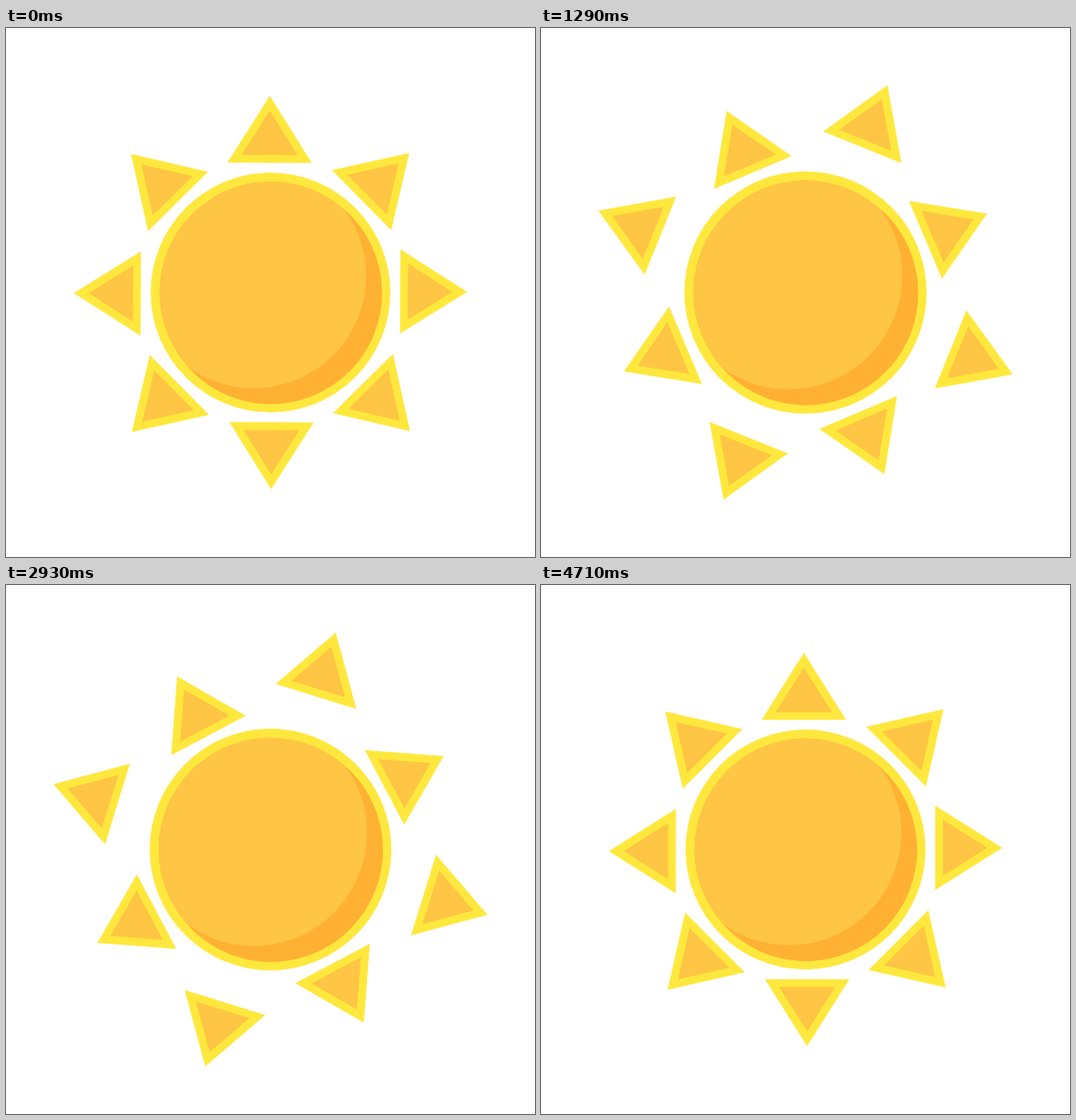
These frames come from a looping animation (640 px wide and 640 px high, 4780 ms). An HTML page:

```html
<!DOCTYPE html>
<html lang="en">
<head>
<meta charset="utf-8">
<title>Sun</title>
<style>
  html, body { margin: 0; height: 100%; overflow: hidden; background: #fff; }
  svg { display: block; width: 100%; height: 100%; }
</style>
</head>
<body>
<svg viewBox="-320 -320 640 640">
  <defs>
    <g id="ray">
      <path fill="#ffe83d" d="M0-238L51-157H-51Z"/>
      <path fill="#ffc544" d="M0-220L34-166.3H-34Z"/>
    </g>
  </defs>
  <g id="rays"></g>
  <g id="disc">
    <circle r="145" fill="#ffe83d"/>
    <circle r="134.5" fill="#ffc544"/>
    <path fill="#ffb134" d="M90-99.9A134.5 134.5 0 1 1-99.9 90A136 136 0 0 0 90-99.9Z"/>
  </g>
</svg>
<script>
  const LOOP = 4780;
  const TURN = 4800, BEAT = 800;
  const STEP_RATE = 14, POSE_RATE = 25;
  // Rays move out and back; peaks alternate between straight and diagonal rays
  const PEAKS = [740, 1480, 2080, 2900, 3730];
  const PUSH = 37, PUSH_TIME = 660;

  const rays = document.getElementById('rays');
  const disc = document.getElementById('disc');
  for (let i = 0; i < 8; i++) {
    const ray = document.createElementNS('http://www.w3.org/2000/svg', 'use');
    ray.setAttribute('href', '#ray');
    rays.append(ray);
  }

  const ease = x => {
    x = Math.min(1, Math.max(0, x));
    return x * x * (3 - 2 * x);
  };

  const push = (t, group) => PEAKS.reduce((sum, peak, k) =>
    k % 2 === group ? sum + PUSH * ease(1 - Math.abs(t - peak) / PUSH_TIME) : sum, 0);

  function draw(t) {
    const angle = 360 * ease(t / TURN) + 0.3;
    const offsets = [push(t, 0), push(t, 1)];
    [...rays.children].forEach((ray, i) => ray.setAttribute('transform',
      `rotate(${angle + 45 * i}) translate(-2 ${-offsets[i % 2]})`));

    const swell = ease(1 - Math.abs(t / BEAT % 2 - 1));
    disc.setAttribute('transform', `scale(${1 + 5.5 / 145 * swell})`);
  }

  // The picture steps 14 times a second through poses spaced 1/25 s apart
  function poseTime(now) {
    const step = Math.floor((now + 5) * STEP_RATE / 1000);
    return Math.floor((step + 0.5) * POSE_RATE / STEP_RATE) * 1000 / POSE_RATE;
  }

  function tick() {
    draw(poseTime(performance.now() % LOOP));
    requestAnimationFrame(tick);
  }
  tick();
</script>
</body>
</html>
```
